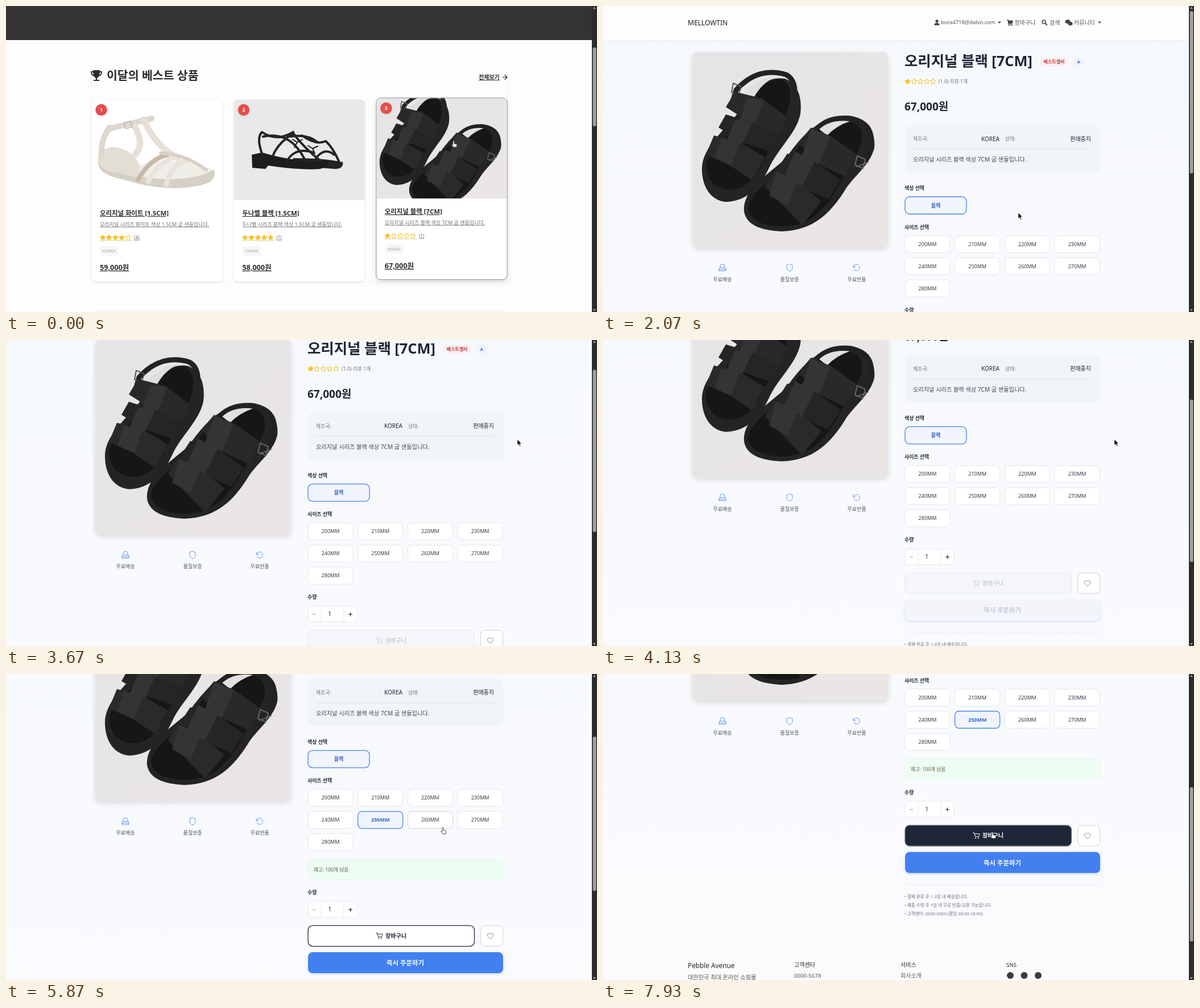
These frames come from a looping animation (1039x539 px, 8000 ms). An HTML page:

```html
<!DOCTYPE html>
<html lang="ko">
<head>
<meta charset="utf-8">
<title>Shop</title>
<style>
html, body { margin: 0; width: 100%; height: 100%; overflow: hidden; background: #fefdfe; }
svg { display: block; width: 100%; height: 100%; font-family: "Noto Sans", "Noto Sans CJK KR", sans-serif; }
.u { text-decoration: underline; }
.line { fill: none; stroke-linecap: round; stroke-linejoin: round; }
</style>
</head>
<body>
<svg id="stage" viewBox="0 0 1039 539"></svg>
<script>
// y is the vertical middle of the text
const text = (x, y, str, size, fill, weight = 400, extra = '') =>
  `<text x="${x}" y="${y + size * .36}" font-size="${size}" fill="${fill}" font-weight="${weight}" ${extra}>${str}</text>`;
const mid = (x, y, str, size, fill, weight, extra = '') =>
  text(x, y, str, size, fill, weight, 'text-anchor="middle" ' + extra);
const rect = (x, y, w, h, r, fill, stroke = 'none', extra = '') =>
  `<rect x="${x}" y="${y}" width="${w}" height="${h}" rx="${r}" fill="${fill}" stroke="${stroke}" ${extra}/>`;
const path = (d, fill, extra = '') => `<path d="${d}" fill="${fill}" ${extra}/>`;
const line = (d, stroke, width = 1, extra = '') =>
  `<path class="line" d="${d}" stroke="${stroke}" stroke-width="${width}" ${extra}/>`;
const dot = (x, y, r, fill, extra = '') => `<circle cx="${x}" cy="${y}" r="${r}" fill="${fill}" ${extra}/>`;
const at = (x, y, body, id = '') => `<g id="${id}" transform="translate(${x} ${y})">${body}</g>`;

const starPath = Array.from({ length: 10 }, (_, i) => {
  const r = i % 2 ? 2.3 : 5.2, a = i * Math.PI / 5;
  return `${(r * Math.sin(a)).toFixed(2)},${(-r * Math.cos(a)).toFixed(2)}`;
}).join(' ');
const stars = (x, y, score) => [0, 1, 2, 3, 4].map(i =>
  `<polygon points="${starPath}" transform="translate(${x + i * 11.2} ${y})" fill="${i < score ? '#f7c325' : 'none'}" stroke="#f3bd1c" stroke-width=".9"/>`).join('');

const cartIcon = (x, y, color) => at(x, y, line('M-5-5h2l2 7h6l1.5-5h-9', color, 1) + dot(-.5, 4.5, 1, color) + dot(4.5, 4.5, 1, color));

// Black sandals, drawn in a 344 px square at 157,81
const blackSandals = `
  ${rect(157, 81, 344, 344, 0, 'url(#wall)')}
  ${path('M174 290C172 250 212 222 240 185C255 148 290 122 320 128C345 138 350 165 347 190C340 225 308 250 292 285C275 322 250 345 215 345C190 342 175 320 174 290Z', '#242325')}
  ${path('M181 282C182 255 220 235 245 195C262 150 290 126 315 130C342 145 326 190 306 222C290 252 276 300 246 318C215 332 184 318 181 282Z', '#161517')}
  ${path('M246 156Q270 127 306 124Q280 134 266 160Z', '#dfdddf')}
  ${line('M226 176L234 148Q272 106 322 121Q335 128 337 146', '#222123', 9)}
  ${line('M229 136l14 6-5 15-12-5z', '#55555a', 2)}
  ${path('M216 178L232 151L280 163L324 196L308 229L262 208Z', '#29282a')}
  ${path('M203 214L216 191L264 206L312 228L297 257L245 240Z', '#252426')}
  ${path('M181 262L195 228L240 240L285 266L262 307L222 280Z', '#2a292b')}
  ${path('M253 162L283 165L268 207L240 203Z M232 201L262 207L245 243L218 235Z M208 232L240 240L226 282L196 268Z', '#343335')}
  ${path('M248 362C245 325 285 300 320 270C345 235 375 195 430 193C465 198 480 222 477 250C470 280 440 300 425 325C400 365 370 395 315 397C275 395 252 385 248 362Z', '#242325')}
  ${path('M255 357C255 330 300 305 330 270C355 225 390 203 430 202C462 208 462 240 440 270C415 310 400 360 350 383C305 395 258 385 255 357Z', '#161517')}
  ${path('M380 217Q400 199 434 203Q410 211 394 228Z', '#e2e0e2')}
  ${line('M370 222Q394 192 437 198Q473 206 472 238Q468 262 452 284', '#222123', 8)}
  ${line('M447 264l14 6-4 16-14-6zM446 283l20-8', '#66666a', 2)}
  ${path('M343 241L366 214L402 230L447 262L425 300L384 281Z', '#29282a')}
  ${path('M305 289L324 260L372 274L418 307L396 341L345 318Z', '#252426')}
  ${path('M285 318L302 290L342 309L384 344L350 386L315 350Z', '#2a292b')}
  ${path('M366 216L400 230L380 279L350 263Z M338 256L372 274L350 318L318 300Z M305 291L342 309L325 352L292 334Z', '#343335')}`;

const whiteSandal = `
  ${path('M162 270C160 300 190 300 225 311C280 326 330 322 357 311Q370 301 366 289L240 280Z', '#d5cfc5')}
  ${path('M165 268Q200 250 235 279Q300 262 364 289Q330 309 260 304L190 292Z', '#f0eee9')}
  ${path('M162 264Q178 240 208 253Q238 265 236 303L196 294Q160 290 162 264Z', '#e3ded5')}
  ${line('M182 214Q166 236 168 263M182 216L256 198', '#ddd7ce', 10)}
  ${line('M242 200Q262 246 302 268M227 214Q244 244 227 262', '#e5e0d8', 11)}
  ${line('M232 306Q254 268 284 262', '#c8baa9', 8)}
  ${line('M250 309Q268 274 300 265M282 314Q290 278 322 271', '#e8e4dd', 9)}
  ${line('M272 259Q318 262 352 289', '#d8d0c5', 6)}
  ${line('M207 206l12-3 3 10-12 3z', '#b9b2a8', 1.5)}`;

const strapSandals = `
  ${path('M505 268Q560 268 592 275Q594 287 578 287L500 281Z', '#232224')}
  ${path('M432 262L433 285L456 287L461 281Q520 290 552 287Q570 282 566 273Q510 276 450 258Z', '#1d1c1e')}
  ${line('M450 260Q440 232 450 222Q475 240 505 222M452 230Q500 220 525 270M470 262Q478 242 505 224Q520 246 552 272M495 271Q510 248 540 258M520 228Q545 246 562 238Q575 250 585 273M500 230Q530 225 548 240M545 268Q560 248 577 262', '#242325', 4)}
  ${line('M512 240l-8-5m8 5l9-5m-9 5l-5 9m32 2l-8-5m8 5l9-4m-9 4l4 9', '#1d1c1e', 2)}`;

function card(i, photo, name, desc, score, count, origin, price) {
  const x = 150 + i * 250.4, hot = i === 2, L = x + 15;
  return at(0, hot ? -3 : 0, `
    <g filter="url(#${hot ? 'lift' : 'soft'})">${rect(x, 165, 230.5, 320, 8, '#fff', hot ? '#a9a9ad' : '#f3f3f5')}</g>
    <g clip-path="url(#photo${i})">${photo}</g>
    ${hot ? rect(x, 165, 230.5, 320, 8, 'none', '#a9a9ad') : ''}
    <g filter="url(#soft)">${dot(x + 17.5, 183, 10.2, '#e5504c')}</g>
    ${mid(x + 17.5, 183, i + 1, 8.5, '#fff', 700)}
    ${text(L, 365, name, 11.4, '#2b2a2d', 600, 'class="u"')}
    ${text(L, 384.5, desc, 9, '#707074', 400, 'class="u"')}
    ${stars(L + 5, 408, score)}
    ${line(`M${L} 413.5h56`, '#c9b670', .6)}
    ${text(L + 60, 408, `(${count})`, 8, '#707074', 400, 'class="u"')}
    ${rect(L, 422.5, 33, 17, 4, '#f6f6f8')}
    ${text(L + 5, 431.5, origin, 7.2, '#a3a3a8')}
    ${text(L, 460.5, price, 12.6, '#2b2a2d', 700, 'class="u"')}`);
}

const home = `
  ${rect(0, 0, 1030, 539, 0, '#fefdfe')}
  ${rect(0, 0, 1030, 60, 0, '#343235')}
  ${rect(149.5, 110.5, 732, 375, 6, 'none', '#f5f4f6')}
  ${path('M153 113h12v2h4q0 8-6 9-1 3-3 3v3h4v2h-10v-2h4v-3q-2 0-3-3-6-1-6-9h4zM151 117q0 3 3 4l-1-4zM167 117h-2l-1 4q3-1 3-4z', '#2b2a2d')}
  ${text(177, 123, '이달의 베스트 상품', 20.5, '#2b2a2d', 700)}
  ${text(831, 125.5, '전체보기', 10, '#2b2a2d', 600, 'class="u"')}
  ${line('M873 125.5h8m-4-4l4 4-4 4', '#2b2a2d', 1.2)}
  ${card(0, whiteSandal, '오리지널 화이트 [1.5CM]', '오리지널 시리즈 화이트 색상 1.5CM 굽 샌들입니다.', 4, 4, 'KOREA', '59,000원')}
  ${card(1, rect(400, 165, 231, 177, 0, '#e9e8ea') + strapSandals, '두나벨 블랙 [1.5CM]', '두나벨 시리즈 블랙 색상 1.5CM 굽 샌들입니다.', 5, 1, 'CHINA', '58,000원')}
  ${card(2, `<g transform="translate(766 253.5) scale(.705) translate(-329 -253)">${blackSandals}</g>`, '오리지널 블랙 [7CM]', '오리지널 시리즈 블랙 색상 7CM 굽 샌들입니다.', 1, 1, 'KOREA', '67,000원')}
  ${line('M152 537.5H878', '#f2f1f4')}`;

const perk = (x, icon, label) => at(x, 461, line(icon, '#5f97ee', 1)) + mid(x, 481.5, label, 9, '#4b5563');
const sizeButton = i => {
  const x = 531 + i % 4 * 87.7, y = 404.5 + (i / 4 | 0) * 39;
  return rect(x, y, 79, 30, 7, '#fff', '#e2e6ee', `id="box${i}"`) + mid(x + 39.5, y + 15, 200 + i * 10 + 'MM', 9, '#333b48', 500, `id="size${i}"`);
};
const caret = x => path(`M${x - 3} 27.5h6l-3 3.2z`, '#444');

const product = `
  ${rect(0, 0, 1030, 1040, 0, 'url(#sky)')}
  ${rect(0, 0, 1030, 60, 0, '#fefdfe')}
  ${line('M0 60.5H1030', '#ececf0')}
  ${text(149, 30, 'MELLOWTIN', 12, '#1d1d20')}
  ${dot(587, 26.5, 2.6, '#444') + path('M582.5 34q0-4.500 4.500-4.500t4.500 4.500z', '#444')}
  ${text(594, 29, 'bora4718@dalvo.com', 9.4, '#555')}${caret(697)}
  ${path('M710 24h2.500l.5 1.500h8l-1.500 6h-6l.3 1h6v1h-7l-1.500-8.500h-1.300z', '#444')}${dot(714, 34, 1, '#444')}${dot(719, 34, 1, '#444')}
  ${text(723.5, 29, '장바구니', 10, '#555')}
  ${line('M778 31l2.300 2.300', '#444', 2)}${dot(775, 28, 3, 'none', 'stroke="#444" stroke-width="1.6"')}
  ${text(785, 29, '검색', 10, '#555')}
  <ellipse cx="817" cy="27.500" rx="4.500" ry="3.600" fill="#444"/><ellipse cx="821.500" cy="31" rx="4" ry="3.200" fill="#444"/>
  ${text(828, 29, '커뮤니티', 10, '#555')}${caret(873)}

  <g filter="url(#lift)">${rect(157, 81, 344, 344, 11, '#e9e7e8')}</g>
  <g clip-path="url(#big)">${blackSandals}</g>
  ${perk(210, 'M-6 5.500h12v-3.500q0-2-2-2h-8q-2 0-2 2zM-4 0v-2.500q0-4 4-4t4 4v2.500M-6 3h12', '무료배송')}
  ${perk(328, 'M0-6.500l5 2v4q0 5-5 7-5-2-5-7v-4z', '품질보증')}
  ${perk(446, 'M-6-5v4h4M-5.500-1.500a5.500 5.500 0 1 1 .5 4', '무료반품')}

  ${text(530, 97, '오리지널 블랙 [7CM]', 25.4, '#1e2535', 700)}
  ${rect(768, 91, 50, 15, 7.5, '#f8eff1')}${mid(793, 98.5, '베스트셀러', 8, '#c23b38', 700)}
  ${rect(826, 91, 20.5, 15, 7.5, '#edf3fd')}${mid(836.2, 98.5, 'A', 7.6, '#3b6fd8', 600)}
  ${stars(535.5, 133, 1)}
  ${text(590, 133, '(1.0) 리뷰 1개', 8.7, '#6b7280')}
  ${text(530, 177, '67,000원', 19, '#1e2535', 700)}
  ${rect(531, 210, 343, 83.5, 8, '#f1f4f8')}
  ${text(545, 234, '제조국:', 8.8, '#707885')}
  ${text(697, 234, 'KOREA', 10, '#1e2535', 500, 'text-anchor="end"')}
  ${text(707, 234, '상태:', 8.8, '#707885')}
  ${text(858, 234, '판매중지', 10, '#1e2535', 500, 'text-anchor="end"')}
  ${line('M545 252H859', '#dde3ea')}
  ${text(545, 270.5, '오리지널 시리즈 블랙 색상 7CM 굽 샌들입니다.', 10.2, '#3f4856')}
  ${text(530, 321, '색상 선택', 8.9, '#1e2535', 700)}
  ${rect(531, 336, 108, 30.5, 8, '#f1f5fd', '#4682ee', 'stroke-width="1.3"')}
  ${mid(585, 351.5, '블랙', 9, '#3563c4', 600)}
  ${text(530, 389.5, '사이즈 선택', 8.9, '#1e2535', 700)}
  ${[0, 1, 2, 3, 4, 5, 6, 7, 8].map(sizeButton).join('')}
  <g id="stock">
    ${rect(531, 528, 343, 35.5, 6, '#eefdf3', '#e0f8e8')}
    ${text(541, 546, '재고: 100개 남음', 8.6, '#5c5a41', 500)}
  </g>
  <g id="lower">
    ${text(530, 535.5, '수량', 8.9, '#1e2535', 700)}
    ${rect(531, 551, 86, 28, 5, '#fff', '#e5e8ee')}
    ${line('M554 551v28M594 551v28', '#e5e8ee')}
    ${line('M539.500 565.500h5', '#9a9fa8')}
    ${mid(569, 565, '1', 10, '#1e2535')}
    ${line('M602.500 565.500h6m-3-3v6', '#333', 1.2)}
    ${rect(531, 593.5, 292.5, 36.5, 8, '#f4f6fa', '#e8ebf1', 'id="cart" stroke-width="1.3"')}
    <g id="cartLabel">${cartIcon(655.5, 611.5, 'currentColor')}${text(667, 611.5, '장바구니', 10.1, 'currentColor', 600)}</g>
    ${rect(834.5, 593.5, 39, 36.5, 8, '#fff', '#d3d7de', 'stroke-width="1.2"')}
    ${line('M851.500 617l-4.500-4.500q-2-3 .7-5 2.300-1 3.800 1.200 1.500-2.200 3.800-1.200 2.700 2 .7 5z', '#8b9099')}
    <g filter="url(#blue)">${rect(531, 640.5, 343, 37, 8, '#f3f5fa', 'none', 'id="order"')}</g>
    ${mid(702, 659.5, '즉시 주문하기', 11.4, '#c3c8d2', 600, 'id="orderLabel"')}
    ${line('M531 698H874', '#e9ecf1')}
    ${text(530, 719.5, '• 결제 완료 후 1-3일 내 배송됩니다.', 7.6, '#6b7280')}
    ${text(530, 734.5, '• 제품 수령 후 7일 내 무료 반품/교환 가능합니다.', 7.6, '#6b7280')}
    ${text(530, 749.5, '• 고객센터: 0000-0000 (평일 09:00-18:00)', 7.6, '#6b7280')}
    ${text(149, 841, 'Pebble Avenue', 11.8, '#2a2a2e', 500)}
    ${text(149, 861, '대한민국 최대 온라인 쇼핑몰', 10.2, '#555')}
    ${text(336, 839, '고객센터', 10, '#2a2a2e', 500)}
    ${text(336, 858.5, '0000-5678', 9.7, '#555')}
    ${text(523, 839, '서비스', 10, '#2a2a2e', 500)}
    ${text(523, 858.5, '회사소개', 10, '#555')}
    ${text(709, 839, 'SNS', 9.8, '#2a2a2e', 500)}
    ${[716, 740.5, 765].map(x => dot(x, 858, 6, '#3c3c40')).join('')}
  </g>`;

const $ = id => document.getElementById(id);
$('stage').innerHTML = `
  <defs>
    <linearGradient id="wall" x2="1" y2="1"><stop stop-color="#e5e4e6"/><stop offset="1" stop-color="#ebe6e6"/></linearGradient>
    <linearGradient id="sky" x2="0" y2="1"><stop stop-color="#f6f9fc"/><stop offset=".6" stop-color="#f9fafd"/><stop offset="1" stop-color="#fcfbfd"/></linearGradient>
    <filter id="soft"><feDropShadow dx="0" dy="1.500" stdDeviation="1.500" flood-opacity=".1"/></filter>
    <filter id="lift"><feDropShadow dx="0" dy="4" stdDeviation="5" flood-opacity=".12"/></filter>
    <filter id="blue"><feDropShadow dx="0" dy="3" stdDeviation="3" flood-color="#4280ef" flood-opacity=".2"/></filter>
    <clipPath id="big">${rect(157, 81, 344, 344, 11, '#000')}</clipPath>
    ${[0, 1, 2].map(i => `<clipPath id="photo${i}">${path(`M${150 + i * 250.4} 342v-169q0-8 8-8h214.500q8 0 8 8v169z`, '#000')}</clipPath>`).join('')}
  </defs>
  <g id="home">${home}</g>
  <g id="product">${product}</g>
  ${rect(1030, 0, 9, 539, 0, '#2c2b2d')}
  ${path('M1032 5h5l-2.500-3.500zM1032 534h5l-2.500 3.500z', '#a2a2a4')}
  ${rect(1031.7, 73, 6, 139, 3, '#a0a0a2', 'none', 'id="thumb"')}
  <g id="pointer">
    ${path('M0 0v10.500l2.500-2.300 1.800 4 1.700-.8-1.800-3.800h3.300z', '#0a0a0a', 'id="arrow" stroke="#fff" stroke-width=".6"')}
    ${path('M-1.200.8a1.200 1.200 0 0 1 2.400 0v3.400l3.600 1q1.200.5 1 2l-.7 3.500h-5.400l-3-4q0-1.600 1.800-.4l.3.3z', '#fff', 'id="hand" stroke="#222" stroke-width=".8"')}
  </g>`;

const DURATION = 8000;
const pointerKeys = [[70, 787, 238], [870, 760, 300], [1070, 760, 300], [1200, 752, 322], [1470, 752, 322], [1870, 730, 364],
  [2350, 730, 364], [2870, 758, 170], [3020, 758, 170], [3070, 761, 170], [3350, 761, 170], [3600, 899, 175],
  [4270, 899, 175], [4850, 661, 270], [5330, 661, 270], [5750, 768, 271], [5870, 768, 271], [6470, 766, 271],
  [7000, 692, 281], [7130, 685, 279]];
const scrollKeys = [[3480, 0], [3670, 82], [3930, 160], [4180, 189], [5800, 189], [5870, 201], [6130, 305], [6400, 378]];

function sample(keys, t, k = 1) {
  const i = keys.findIndex(key => key[0] > t);
  if (i === 0) return keys[0][k];
  if (i < 0) return keys[keys.length - 1][k];
  const a = keys[i - 1], b = keys[i];
  return a[k] + (b[k] - a[k]) * (t - a[0]) / (b[0] - a[0]);
}
const ramp = (t, from, to) => Math.min(1, Math.max(0, (t - from) / (to - from)));
const rgb = hex => [1, 3, 5].map(i => parseInt(hex.slice(i, i + 2), 16));
const mix = (a, b, p) => {
  const A = rgb(a), B = rgb(b);
  return `rgb(${A.map((v, i) => Math.round(v + (B[i] - v) * p))})`;
};
const set = (id, attrs) => { for (const k in attrs) $(id).setAttribute(k, attrs[k]); };
const show = (id, on) => set(id, { display: on ? 'inline' : 'none' });
const move = (id, x, y) => set(id, { transform: `translate(${x} ${y})` });

function draw(t) {
  const onProduct = t >= 2070, hasStock = t >= 5000, y = sample(scrollKeys, t);
  show('home', !onProduct);
  show('product', onProduct);
  show('stock', hasStock);
  move('product', 0, -y);
  move('lower', 0, hasStock ? 51 : 0);
  set('thumb', onProduct
    ? { y: 9 + y * (hasStock ? .503 : .524), height: hasStock ? 272 : 286 }
    : { y: 73, height: 139 });

  const picked = ramp(t, 5330, 5500), hover = ramp(t, 6330, 6500), pressed = ramp(t, 7780, 7930);
  const hover250 = ramp(t, 4800, 4950), hover260 = ramp(t, 5640, 5760) - ramp(t, 5900, 6020);
  set('box5', {
    fill: mix('#ffffff', '#f0f5fd', picked),
    stroke: picked ? mix('#cbd0da', '#4682ee', picked) : mix('#e2e6ee', '#cbd0da', hover250),
    'stroke-width': 1 + picked * .3
  });
  set('size5', { fill: mix('#333b48', '#3563c4', picked), 'font-weight': picked > .5 ? 600 : 500 });
  set('box6', { stroke: mix('#e2e6ee', '#cbd0da', hover260) });

  const ink = '#1e2738';
  set('cart', {
    fill: hover ? mix('#ffffff', ink, hover) : mix('#f4f6fa', '#ffffff', picked),
    stroke: pressed ? mix(ink, '#6b7380', pressed) : mix('#e8ebf1', ink, picked)
  });
  set('cartLabel', { color: hover ? mix(ink, '#ffffff', hover) : mix('#c8ccd4', ink, picked) });
  set('order', { fill: mix('#f3f5fa', '#4280ef', picked) });
  set('orderLabel', { fill: mix('#c3c8d2', '#ffffff', picked) });

  const arrow = onProduct && t < 4800;
  show('arrow', arrow);
  show('hand', !arrow);
  move('pointer', sample(pointerKeys, t), sample(pointerKeys, t, 2));
}

const start = performance.now();
function tick() {
  draw((performance.now() - start) % DURATION);
  requestAnimationFrame(tick);
}
tick();
</script>
</body>
</html>
```
